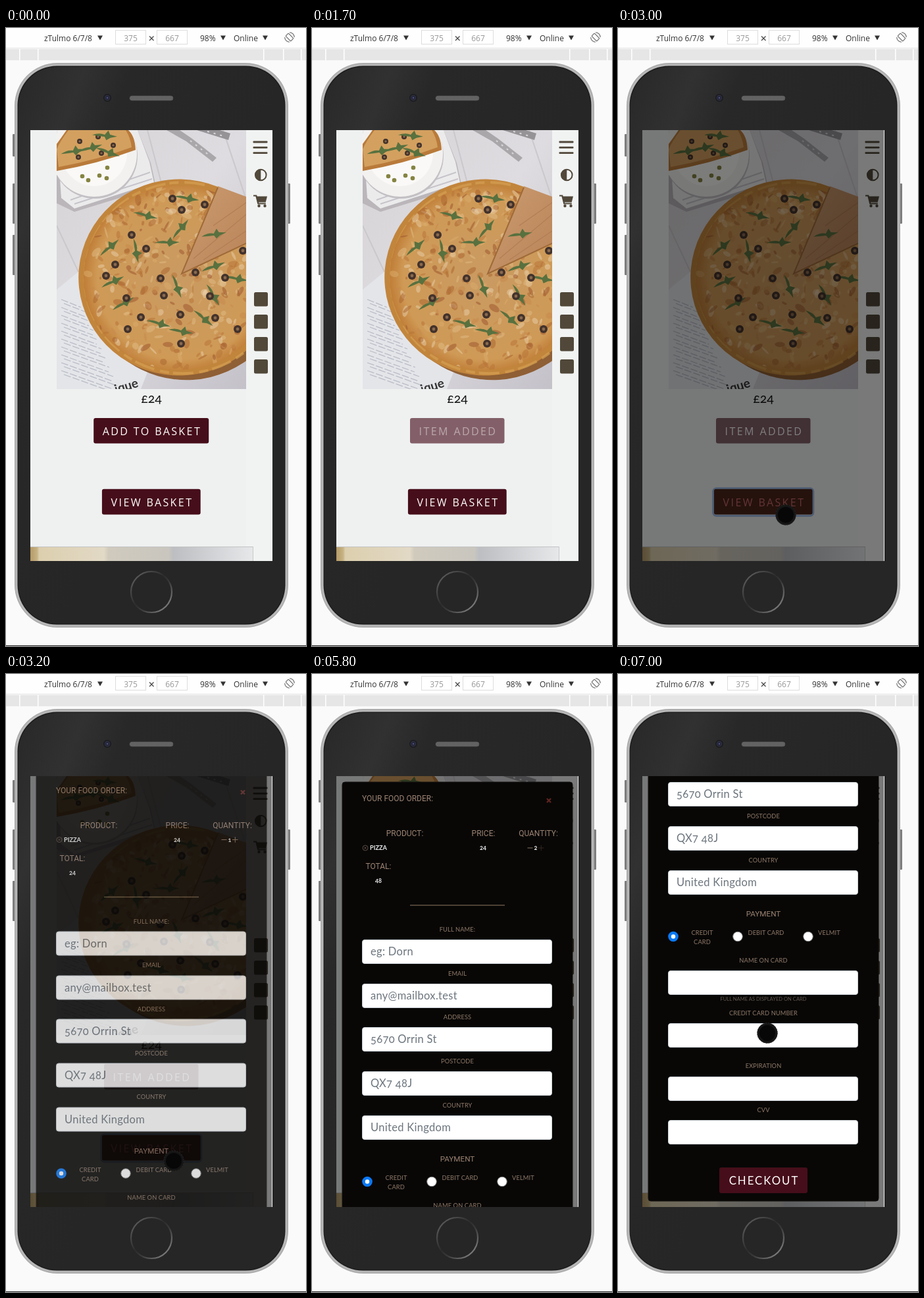
Recreate the animation shown at these times as an HTML page. Size 456 by 938 pixels, loop 7.1 s.

```html
<!DOCTYPE html>
<html lang="en">
<head>
<meta charset="utf-8">
<title>Basket demo</title>
<style>
html, body { margin: 0; width: 100%; height: 100%; overflow: hidden; background: #fafafa; }
svg { display: block; }
.ui { font: 12px "Open Sans", sans-serif; fill: #333; }
.btn { font: 16px "Open Sans", sans-serif; letter-spacing: 2.4px; }
.head { font: 12px Roboto, sans-serif; fill: #9c8373; }
.label { font: 9.3px Lato, sans-serif; letter-spacing: .1px; fill: #8f7968; }
.cell { font: bold 9.2px Lato, sans-serif; fill: #eee; font-variant-numeric: oldstyle-nums; }
.field { font: 16.5px Lato, sans-serif; letter-spacing: .3px; fill: #6c757d; font-variant-numeric: oldstyle-nums; }
.hint { font: 7.6px Lato, sans-serif; fill: #625850; }
.price { font: 19.5px Lato, sans-serif; fill: #111; font-variant-numeric: oldstyle-nums; }
.mid { text-anchor: middle; }
</style>
</head>
<body>
<svg id="stage" width="456" height="938" viewBox="0 0 456 938" xmlns="http://www.w3.org/2000/svg"></svg>
<script>
const LOOP = 7100, STEP = 100;
const INK = '#51483a', WINE = '#460e1a';
const stage = document.getElementById('stage');

let seed = 7;
const rnd = () => (seed = (seed * 16807) % 2147483647) / 2147483647;

const rect = (x, y, w, h, fill, more = '') =>
  `<rect x="${x}" y="${y}" width="${w}" height="${h}" fill="${fill}" ${more}/>`;
const circle = (x, y, r, fill, more = '') =>
  `<circle cx="${x}" cy="${y}" r="${r}" fill="${fill}" ${more}/>`;
const path = (d, fill, more = '') => `<path d="${d}" fill="${fill}" ${more}/>`;
const text = (x, y, cls, s, more = '') => `<text x="${x}" y="${y}" class="${cls}" ${more}>${s}</text>`;
const mid = (x, y, cls, s, more) => text(x, y, cls + ' mid', s, more);
const grad = (id, dir, stops) => `<linearGradient id="${id}" ${dir}>` +
  stops.map(([o, c]) => `<stop offset="${o}" stop-color="${c}"/>`).join('') + '</linearGradient>';

const defs = () => '<defs>' +
  grad('body', 'x1="0" y1="0" x2=".6" y2=".5"', [[0, '#282828'], [.25, '#313131'], [.42, '#282828'], [1, '#262626']]) +
  grad('home', 'x1="0" y1="0" x2="1" y2="1"', [[0, '#6a6a6a'], [.45, '#2c2c2c'], [.6, '#3a3a3a'], [1, '#999']]) +
  grad('table', 'x1="0" y1="0" x2="1" y2="1"', [[0, '#d6d3d6'], [.5, '#dedce0'], [1, '#c4c1c9']]) +
  grad('strip', 'x1="0" x2="1" y1="0" y2="0"',
    [[0, '#b69b68'], [.03, '#c6b283'], [.04, '#dccfae'], [.33, '#e2d9c6'], [.35, '#d0cabd'], [.62, '#c9c6bf'], [.64, '#bcbec1'], [1, '#e6e8ea']]) +
  grad('wood', 'x1="0" y1="0" x2="1" y2="1"', [[0, '#cb9c70'], [1, '#b98358']]) +
  `<radialGradient id="cheese"><stop offset="0" stop-color="#c99a62"/><stop offset=".85" stop-color="#cf9a56"/>
   <stop offset="1" stop-color="#bf7c36"/></radialGradient>
   <pattern id="mesh" width="2" height="2" patternUnits="userSpaceOnUse">${rect(0, 0, 2, 2, '#444')}${rect(0, 0, 1, 1, '#8a8a8a')}${rect(1, 1, 1, 1, '#777')}</pattern>
   <clipPath id="screen">${rect(37, 155, 368, 654, '#000')}</clipPath>
   <clipPath id="photo">${rect(77, 155, 288, 393, '#000')}</clipPath>
   <clipPath id="pie"><ellipse cx="263" cy="379" rx="145" ry="140"/></clipPath></defs>`;

const arrow = x => path(`M${x - 4} 11.5h8l-4 7z`, '#333');
const toolbar = () =>
  rect(0, 0, 456, 938, '#fafafa') + rect(0, 0, 456, 30, '#fefefe') + rect(0, 30, 456, 1, '#e3e3e3') +
  rect(0, 32, 456, 17, '#e6e6e6') + [20, 48, 391, 421, 448].map(x => rect(x, 32, 1.5, 17, '#fff')).join('') +
  text(58, 20, 'ui', 'zTulmo 6/7/8') + arrow(143) +
  [[166, 375], [229, 667]].map(([x, n]) => rect(x + .5, 3.5, 46, 21, '#fff', 'stroke="#ddd"') +
    mid(x + 23.5, 20, 'ui', n, 'style="fill:#999"')).join('') +
  path('M218 12.5l6.5 6.5m0-6.5l-6.5 6.5', 'none', 'stroke="#444" stroke-width="1.2"') +
  text(295, 20, 'ui', '98%') + arrow(330) + text(346, 20, 'ui', 'Online') + arrow(394) +
  `<g fill="none" stroke="#666" stroke-width="1.1" transform="translate(431 14)">
   <rect x="-3" y="-5.5" width="6" height="11" rx="1" transform="rotate(-45)"/>
   <path d="M0-7.3A7.3 7.3 0 0 1 7.3 0M0 7.3A7.3 7.3 0 0 1-7.3 0"/></g>` +
  rect(0, 937, 456, 1, '#2a2a2a');

const phone = () =>
  [[10, 161, 34], [10, 236, 61], [10, 314, 61], [428, 236, 61]].map(([x, y, h]) =>
    rect(x, y, 4, h, '#7d7d7d', 'rx="1"')).join('') +
  rect(13, 53, 416, 857, '#a9a9a9', 'rx="65"') + rect(14.5, 54.5, 413, 854, '#b8b8b8', 'rx="63"') +
  rect(17.5, 57.5, 407, 848, '#1d1d1d', 'rx="60"') + rect(19, 59, 404, 845, 'url(#body)', 'rx="59"') +
  circle(154, 106, 6, '#1b1b22') + circle(154, 106, 3.8, '#22243a', 'stroke="#34343e"') + circle(154, 106, 1.3, '#4c4f78') +
  rect(188, 103, 66, 7, 'url(#mesh)', 'rx="3.5" stroke="#555" stroke-width=".6"') +
  circle(221, 856, 31, 'none', 'stroke="url(#home)" stroke-width="2.2"');

const many = (n, f) => Array.from({ length: n }, f).join('');
const olive = (x, y, r = 6) => circle(x, y, r, '#42322c') + circle(x, y, r * .4, '#8b6a4c');
const leaf = ([x, y, a]) => path('M-19 1Q-8-4 0-1L5-8 8-2 19 0 9 3 3 7 0 2Q-8 2-19 1z', '#58713f',
  `transform="translate(${x} ${y}) rotate(${a})"`);

function photo() {
  const olives = [[253, 259], [302, 268], [267, 276], [191, 314], [213, 335], [166, 359], [152, 376], [235, 380], [288, 371],
    [333, 379], [360, 338], [240, 406], [310, 407], [183, 410], [205, 439], [265, 435], [318, 440], [352, 457], [185, 457], [266, 479]];
  const leaves = [[212, 284, 15], [198, 338, 80], [157, 333, -40], [178, 418, -30], [265, 305, -50], [245, 325, 0], [260, 392, 70],
    [232, 448, 15], [266, 460, 10], [300, 440, 40], [315, 405, 60], [350, 380, 10], [315, 362, -20], [162, 385, -25], [275, 258, 10]];
  const tones = ['#e2bd85', '#dcae6c', '#a9652f', '#b87437', '#ead0a9', '#9c552c', '#c88a4c'];
  const blobs = many(420, () => {
    const a = rnd() * 6.28, r = Math.sqrt(rnd()) * 142;
    const x = 263 + r * Math.cos(a), y = 379 + r * Math.sin(a);
    return `<ellipse rx="${2 + rnd() * 7}" ry="${1 + rnd() * 4}" fill="${tones[rnd() * 7 | 0]}" opacity=".5"
      transform="translate(${x} ${y}) rotate(${rnd() * 180})"/>`;
  });
  const lines = many(20, (_, i) => path(`M${84 + i % 2 * 4} ${412 + i * 6}l${30 + i * 3} ${12 + i}`, 'none',
    'stroke="#b9bcc6" stroke-width="1.3" stroke-dasharray="11 3"'));
  return `<g clip-path="url(#photo)">` + rect(77, 155, 288, 393, 'url(#table)') +
    path('M215 155L240 250M330 155L365 260M77 300L110 370', 'none', 'stroke="#cbc8cc" stroke-width="2"') +
    path('M77 266L104 279 228 241 220 205 200 155H77z', '#bab6ba') +
    path('M84 258L104 274 225 235 218 203 200 155H77z', '#ecebec') +
    path('M104 267L222 229M98 261L219 219', 'none', 'stroke="#c6c4ca" stroke-width="2"') +
    circle(135, 194, 65, '#c3c0c4') + circle(134, 191, 65, '#f2f1ef') + circle(134, 190, 50, '#faf9f7') +
    path('M77 217Q140 206 197 185Q196 164 186 155H92Q83 168 77 176z', '#b97a3a') +
    path('M80 211Q140 200 191 181Q189 166 182 155H95Q82 172 77 184z', '#d3a05f') +
    [[112, 172], [140, 165], [163, 178], [110, 196], [145, 190]].map(p => olive(...p, 4)).join('') +
    [[128, 182, -15], [155, 188, 20], [150, 163, 5], [102, 187, -10]].map(leaf).join('') +
    [[116, 225], [125, 231], [142, 224], [154, 212], [153, 228]].map(([x, y]) => circle(x, y, 3.3, '#858442')).join('') +
    path('M244 155L274 172 314 203 320 197 283 168 264 155z', '#aaa7ab') +
    path('M290 155L338 170 341 160 325 155z', '#969397') +
    path('M280 171l30 23m-4-37l28 8', 'none', 'stroke="#d8d6d9" stroke-width="2" stroke-dasharray="3 7"') +
    path('M77 397L110 370 220 510 205 548H77z', '#e4e5e9') + lines +
    text(164, 557, 'mid', 'ique', 'transform="rotate(-17 164 557)" style="font:bold 19px Lato,sans-serif;fill:#333" dx="22" dy="-1"') +
    path('M322 242L365 262V500Q330 530 262 533L266 374z', 'url(#wood)') +
    path('M266 374L322 242A153 149 0 1 0 380 490L365 326z', '#8f5f35', 'transform="translate(1 2)"') +
    path('M266 374L322 241A153 149 0 1 0 390 462V326z', '#c2853c') +
    path('M302 238A149 145 0 1 0 365 490', 'none', 'stroke="#d5a052" stroke-width="4" stroke-dasharray="31 9 14 6" opacity=".7"') +
    `<g clip-path="url(#pie)">` + circle(263, 379, 146, 'url(#cheese)') + blobs +
    leaves.map(leaf).join('') + olives.map(p => olive(...p)).join('') + '</g>' +
    path('M267 373L322 240 365 256V327z', 'url(#wood)') +
    path('M285 350L365 283M300 352L365 308M315 300L365 265', 'none', 'stroke="#b27d54" stroke-width="1.2"') +
    path('M322 242L267 373L365 327', 'none', 'stroke="#9f6a38" stroke-width="2"') + leaf([316, 313, -8]) + '</g>';
}

const button = (id, cx, y, w, h, s) => `<g id="${id}">` +
  rect(cx - w / 2, y, w, h, WINE, 'rx="3"') + mid(cx + 1.2, y + 26, 'btn', s, 'fill="#fff"') + '</g>';

const page = () =>
  rect(37, 155, 368, 654, '#eff1f1') + rect(365, 155, 40, 654, '#f1f3f2') + photo() +
  [173, 181.4, 189.6].map(y => rect(375.5, y - 1.4, 22, 2.8, INK, 'rx="1"')).join('') +
  circle(387.3, 223, 8.3, 'none', `stroke="${INK}" stroke-width="2"`) + path('M387.3 214a9 9 0 0 0 0 18z', INK) +
  path('M376 254.5h4.3l3 12h11.5', 'none', `stroke="${INK}" stroke-width="2.2"`) + path('M380.5 255.5h16.5l-2.3 9h-12.3z', INK) +
  circle(384.5, 270, 2.2, INK) + circle(393.5, 270, 2.2, INK) +
  [401, 435, 469, 503].map(y => rect(377, y, 21, 21.5, INK, 'rx="2.5"')).join('') +
  mid(221, 569, 'price', '£24') +
  button('add', 220.7, 592, 175, 38.5, 'ADD TO BASKET') +
  `<g id="added">${rect(149, 592, 143.5, 38.5, '#836069', 'rx="3"')}${mid(222, 618, 'btn', 'ITEM ADDED', 'fill="#fff" id="addedText"')}</g>` +
  rect(144.5, 698.5, 152.5, 42, 'none', 'rx="5" stroke="#7fa9e8" stroke-width="2.5" id="ring"') +
  button('view', 220.8, 699.8, 149.8, 38.8, 'VIEW BASKET') +
  rect(37, 787, 339, 22, 'url(#strip)') + rect(37, 787, 339, 1, '#c3c3c3') + rect(375, 787, 1, 22, '#c9c9c9');

const input = (y, s = '') => rect(76.5, y + .5, 288, 36, '#fff', 'rx="3.5" stroke="#ced4da"') + text(89, y + 24, 'field', s);

function form() {
  const fields = [['FULL NAME:', 'eg: Dorn'], ['EMAIL', 'any@mailbox.test'], ['ADDRESS', '5670 Orrin St'],
    ['POSTCODE', 'QX7 48J'], ['COUNTRY', 'United Kingdom']];
  return rect(46, 164, 350, 1008, '#080706', 'rx="4" stroke="#15120f"') +
    text(76, 193, 'head', 'YOUR FOOD ORDER:') +
    path('M357 189l6 6m0-6l-6 6', 'none', 'stroke="#5e2421" stroke-width="2.4"') +
    mid(141, 246, 'head', 'PRODUCT:') + mid(260.5, 246, 'head', 'PRICE:') + mid(344, 246, 'head', 'QUANTITY:') +
    circle(81, 264, 4, 'none', 'stroke="#6b5a50" stroke-width=".8"') +
    path('M79.3 262.3l3.4 3.4m0-3.4l-3.4 3.4', 'none', 'stroke="#6b5a50" stroke-width=".8"') +
    text(88, 267, 'cell', 'PIZZA') + mid(260, 267, 'cell', '24') +
    path('M327.5 264h8', 'none', 'stroke="#8a7565"') + mid(340, 267, 'cell', '1', 'id="qty"') +
    path('M344 264h8.5m-4.2-4.2v8.5', 'none', 'stroke="#8a7565" id="plus"') +
    mid(101, 296, 'head', 'TOTAL:') + mid(101, 317, 'cell', '24', 'id="total"') +
    rect(149, 350.3, 144, 1.4, '#6c5b47') +
    fields.map(([l, s], i) => mid(221, 391 + i * 66.7, 'label', l) + input(Math.round(403 + i * 66.7), s)).join('') +
    mid(221, 740, 'head', 'PAYMENT', 'style="font-size:11.7px"') +
    circle(84, 770.5, 7.8, '#0a78f5') + circle(84, 770.5, 3.2, '#fff') +
    [182, 289].map(x => circle(x, 770.5, 7.3, '#fff', 'stroke="#777"')).join('') +
    mid(128, 768, 'label', 'CREDIT') + mid(128, 782, 'label', 'CARD') + mid(225, 768, 'label', 'DEBIT CARD') + mid(321, 768, 'label', 'VELMIT') +
    mid(221, 810, 'label', 'NAME ON CARD') + input(822) + mid(221, 867.5, 'hint', 'FULL NAME AS DISPLAYED ON CARD') +
    mid(221, 890, 'label', 'CREDIT CARD NUMBER') + input(902) +
    mid(221, 970, 'label', 'EXPIRATION') + input(983) + mid(221, 1037, 'label', 'CVV') + input(1049) +
    rect(154, 1121, 134, 39, WINE, 'rx="3"') +
    mid(222, 1147, 'btn', 'CHECKOUT', 'style="font:16.8px Lato,sans-serif;letter-spacing:2px" fill="#fff"');
}

stage.innerHTML = defs() + toolbar() + phone() +
  `<g clip-path="url(#screen)">${page()}${rect(37, 155, 367, 654, '#000', 'id="dim"')}<g id="modal">${form()}</g>
   <g id="cursor">${circle(0, 0, 15.5, '#151515')}${circle(0, 0, 15.2, 'none', 'stroke="#2a2a2a" stroke-dasharray="2 2"')}${circle(0, 0, 12, '#070707')}</g></g>`;

const el = id => document.getElementById(id);
const set = (node, props) => { for (const k in props) node.setAttribute(k, props[k]); };
const clamp = x => Math.max(0, Math.min(1, x));
const ramp = (t, a, b) => clamp((t - a) / (b - a));
const easeOut = x => 1 - (1 - x) ** 2;

// Linear interpolation through [time, value] points.
function track(t, keys) {
  let i = 1;
  while (i < keys.length - 1 && t > keys[i][0]) i++;
  const [[a, v], [b, w]] = [keys[i - 1], keys[i]];
  return v + (w - v) * ramp(t, a, b);
}

// Each visit: times and places of the pointer while it is over the screen.
const visits = [
  [[700, 420, 690], [1000, 255, 617], [1400, 255, 617], [1600, 280, 835]],
  [[1900, 300, 830], [2200, 255, 739], [3800, 255, 739], [4000, 345, 365]],
  [[6100, 345, 325], [6300, 227, 543], [6400, 227, 543], [6900, 227, 545], [7100, 227, 545]]
];

function paint(node, fill, ink) {
  node.children[0].setAttribute('fill', fill);
  node.children[1].setAttribute('fill', ink);
}
const hover = (node, on) => on ? paint(node, '#4a241a', '#c8686c') : paint(node, WINE, '#fff');

function draw(t) {
  const visit = visits.find(v => t >= v[0][0] && t <= v[v.length - 1][0]);
  el('cursor').style.display = visit ? '' : 'none';
  if (visit) {
    const x = track(t, visit.map(k => [k[0], k[1]])), y = track(t, visit.map(k => [k[0], k[2]]));
    set(el('cursor'), { transform: `translate(${x} ${y})` });
  }
  const added = t >= 1400;
  el('add').style.display = added ? 'none' : '';
  el('added').style.display = added ? '' : 'none';
  set(el('addedText'), { opacity: .45 + .55 * ramp(t, 1800, 2200) });
  hover(el('add'), t >= 1000);
  hover(el('view'), t >= 2200);
  set(el('ring'), { opacity: t >= 2800 ? .8 : 0 });
  set(el('dim'), { opacity: .5 * ramp(t, 2800, 3000) });

  const shown = easeOut(ramp(t, 3000, 3400));
  const scroll = track(t, [[6200, 0], [6300, 62], [6400, 157], [6600, 285], [6800, 372]]);
  set(el('modal'), { opacity: shown, transform: `translate(0 ${-50 * (1 - shown) - scroll})` });
  const two = t >= 5000;
  el('qty').textContent = two ? '2' : '1';
  el('total').textContent = two ? '48' : '24';
  set(el('plus'), { stroke: t >= 4300 && t < 6100 ? '#33271f' : '#8a7565' });
}

const start = performance.now();
function tick() {
  const t = (performance.now() - start) % LOOP;
  draw(Math.floor(t / STEP) * STEP);
  requestAnimationFrame(tick);
}
tick();
</script>
</body>
</html>
```
